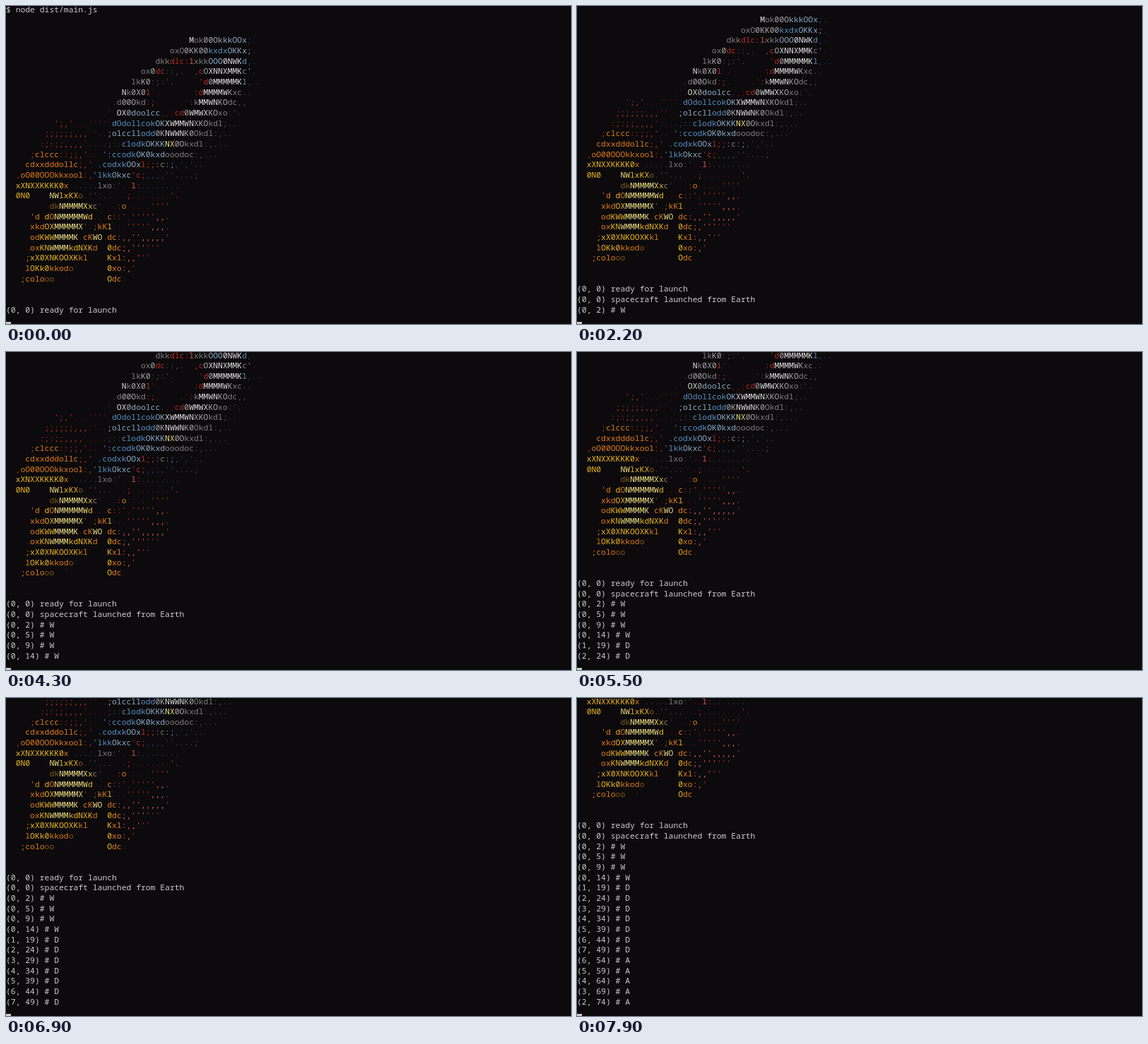
Recreate the animation shown at these times as an HTML page with a canvas. Size 800 px wide and 450 px high, loop 8 s.

```html
<!DOCTYPE html>
<html lang="en">
<head>
<meta charset="utf-8">
<title>Terminal launch</title>
<style>
html, body { margin: 0; width: 100%; height: 100%; overflow: hidden; background: #0c0a0c; }
canvas { display: block; }
</style>
</head>
<body>
<canvas width="800" height="450"></canvas>
<script>
const ctx = document.querySelector('canvas').getContext('2d');
const LOOP = 8000, CELL = 6.82, PITCH = 14.66, BASE = 8.5;

const palette = {
  t: '#cccccc', w: '#dedede', s: '#a9a9a9', g: '#7e7e7e', d: '#484848',
  b: '#568fc0', c: '#8ba9c4', n: '#1d4658', r: '#b52c22', R: '#651010',
  p: '#dc5555', o: '#de7a1c', y: '#ecb726', Y: '#eedf86', m: '#83591c'
};

// Each row: start column, then runs of one palette letter and its text.
const art = [
  [38, 'wM|gok|s00O|ckkkOOx|n;.'],
  [34, 'goxO|s0KK00|bkxdx|cOKKx|g;|n.'],
  [31, 'gdkk|rdlc:|pl|gxkk|cOOO|w0NWK|bd|n,.'],
  [28, 'gox|s0|rdc|d::,.  |r,c|sO|wXNNXMMK|gc|b\'|n.'],
  [26, 'glk|sK0|d:;:\'.     |r\'d|s0|wMMMMMK|bl|n,..'],
  [24, 'wN|gk|s0X0|rl|R\'.       |r:d|wMMMMW|sK|gxc|d..'],
  [22, 'd.|gd|s00O|gkd|r:;|R.    .\'|r:|gk|wMMWN|sKO|gdc|d,,'],
  [20, 'R.\'.|wOX|s0|cdoolcc|R,,;|rcd|s0|wWMWX|sKO|gxo|d:\'.'],
  [10, 'r\';,\'|R...\'\'\'\'.|bdOdollcok|cOK|wXWMMWN|sXKO|gkdl|d;..'],
  [8, 'r;;;;;;,,,|R\'\'..|c;olccll|bodd|s0K|wNWWN|sK0|gOkdl|d:,..'],
  [7, 'r:;:;;,,,,|R\'....|n;::|bclodk|cOKKK|YNX|s0O|gkxdl|d:,...'],
  [5, 'r;|oclccc|r::;;,\'|R.. |b\':ccodk|cOK0kxd|gooodoc|d:,...'],
  [4, 'ocdxxdddollc|r;,\' |b.codxk|cOOx|rl;;|g:c:|b;|n,\',\'|d..'],
  [2, 'r,|ooO00OOOkkxool|r:,|b\'lkk|cOkxc|r\'c;|n,,,,\'\'|d....;'],
  [2, 'yxXNXXKKKK0|ox |n.....|glxo|d:\'|R..|pl|r:|n........'],
  [2, 'y0N0    |YNW|ylxKX|mo|d.\'\'...  |R.|r;|R........|r\'.'],
  [9, 'mdk|YNMMMMX|yx|gc|d\'  |R.|r:|oo|R.....|r\'\'\'\''],
  [5, 'o\'d|R.|yd|oO|YNMMMMMW|yd|R...|oc|r::\'|R,|r\'\'\'\'\'|p,,|r.'],
  [5, 'oxkd|yOX|YMMMMMX|m\'|R.|m;|okK|yl|R...|r\'\'\'\'\'|p,,,|r.'],
  [5, 'ood|yKWW|YMMMMK|R.|ocK|YWO|R.|odc|p:,,\'\',,,,,|r\''],
  [4, 'R.|oox|yKN|YWMMM|ykdNXK|od  |y0|odc|p;,\'\'\'|r\'\'\''],
  [4, 'o;|yxX0XNKOOXK|okl    |yK|oxl|p:,,\'|r\'\''],
  [4, 'ol|yOKk0|okkod|mo|R\'      |y0|oxo|p:,|r\''],
  [3, 'o;colo|moo  |R\'        |yO|odc|R.']
];

const lines = [[0, 't$ node dist/main.js'], , , ...art, , ,
  [0, 't(0, 0) ready for launch'], [0, 't(0, 0) spacecraft launched from Earth']];

// Flight log: four thrusts up, seven to the right, then back left.
for (let i = 0, x = 0, y = 0; i < 16; i++) {
  const key = i < 4 ? 'W' : i < 11 ? 'D' : 'A';
  x += { W: 0, D: 1, A: -1 }[key];
  y += Math.min(i + 2, 5);
  lines.push([0, `t(${x}, ${y}) # ${key}`]);
}

// Moments at which a new line scrolls the terminal.
const scrolls = [1700, 1800, 2600, 3200, 3900, 5000, 5400, 5700, 6000,
  6300, 6500, 6800, 7000, 7200, 7400, 7600, 7800];

function drawLine([col, runs], y) {
  for (const run of runs.split('|')) {
    ctx.fillStyle = palette[run[0]];
    for (const ch of run.slice(1)) ctx.fillText(ch, col++ * CELL, y);
  }
}

function draw(t) {
  ctx.fillStyle = '#0c0a0c';
  ctx.fillRect(0, 0, 800, 450);
  ctx.font = '11.37px "Noto Sans Mono", "DejaVu Sans Mono", monospace';
  const top = scrolls.filter(s => s <= t).length;
  for (let i = 0; i < 30; i++) {
    const line = lines[top + i];
    if (line) drawLine(line, i * PITCH + BASE);
  }
  if (t < 700 || t >= 1300) {
    ctx.fillStyle = palette.t;
    ctx.fillRect(0, 447, 7, 3);
  }
}

const start = performance.now();
function tick() {
  draw((performance.now() - start) % LOOP);
  requestAnimationFrame(tick);
}
tick();
</script>
</body>
</html>
```
